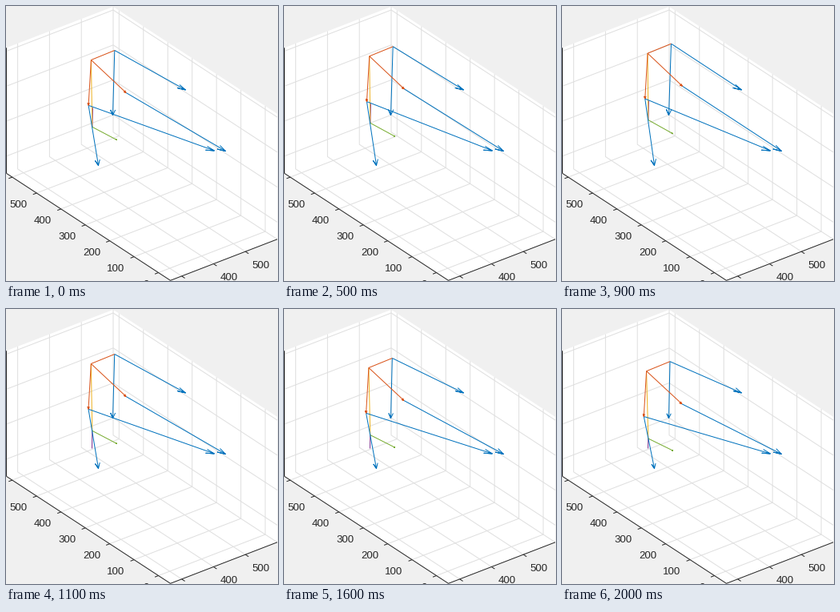
Animation, 340 px wide and 344 px high, one loop 2100 ms. Source, as a matplotlib script:

```python
import numpy as np
import matplotlib.pyplot as plt
from matplotlib.animation import FuncAnimation

W, H, DPI = 340, 344, 72
FRAMES, STEP_MS = 21, 100

BLUE, ORANGE, YELLOW = "#0072BD", "#D95319", "#EDB120"
PURPLE, GREEN = "#7E2F8E", "#77AC30"
INK, GRID, PANEL = "#262626", "#DFDFDF", "#F0F0F0"

plt.rcParams["path.snap"] = False

# Projected axes box
LEFT = np.array([0, 208.8])
X_EDGE = np.array([133.5, -51.5])
Y_EDGE = np.array([205, 134.0])
Z_EDGE = np.array([0, -157.0])
BACK = LEFT + X_EDGE
FRONT = LEFT + Y_EDGE

fig = plt.figure(figsize=(W / DPI, H / DPI), dpi=DPI, facecolor=PANEL)
ax = fig.add_axes([0, 0, 1, 1])
ax.set_xlim(-0.5, W - 0.5)
ax.set_ylim(H - 0.5, -0.5)
ax.axis("off")


def line(*pts, color=INK, lw=1, z=2):
    xs, ys = zip(*pts)
    return ax.plot(xs, ys, color=color, lw=lw, zorder=z,
                   solid_capstyle="butt", solid_joinstyle="miter")[0]


def label(x, y, text):
    ax.text(x, y, text, color=INK, fontsize=13.3, family="Liberation Sans",
            ha="center", va="center_baseline", zorder=3)


def draw_box():
    right = BACK + Y_EDGE
    outline = [LEFT, FRONT, right, right + Z_EDGE, BACK + Z_EDGE, LEFT + Z_EDGE]
    ax.fill(*zip(*outline), color="white", lw=0, zorder=0)

    def grid(*pts):
        line(*pts, color=GRID, z=1)

    for k in range(4):
        p = LEFT + X_EDGE * (14.1 + 39.8 * k) / X_EDGE[0]
        grid(p + Z_EDGE, p, p + Y_EDGE)
    for k in range(7):
        p = LEFT + Y_EDGE * (7.3 + 30.46 * k) / Y_EDGE[0]
        grid(p, p + X_EDGE, p + X_EDGE + Z_EDGE)
        line(p, p + (-4.5, 1.7))
        if k:
            label(p[0] - (22.6 if k < 6 else 15.4), p[1] + 13.5,
                  str(100 * (6 - k)))
    for y in (4.5, 48.3, 92, 135.8):
        p = np.array([BACK[0], y])
        grid(p - X_EDGE, p, p + Y_EDGE)

    for k in range(3):
        p = FRONT + X_EDGE * (14.1 + 39.8 * k) / X_EDGE[0]
        line(p, p + (4, 2.6))
        if k:
            label(p[0] + 19.5, p[1] + 16, str(300 + 100 * k))

    line(LEFT + Z_EDGE, LEFT)
    line(LEFT, FRONT, right)


draw_box()

# Platform corners at rest
CORNERS = {"hub": (105.9, 67), "right": (135.3, 55),
           "mid": (149.6, 108), "low": (102.6, 123.8)}
# Corner, fixed tip, two head wings
LEGS = [
    ("right", (224, 104.5), (-10.5, -2.5), (-7.5, -6.5)),
    ("right", (133, 136), (-2.8, -6.5), (3.2, -6.5)),
    ("mid", (274, 181), (-10.5, -2.5), (-7, -7)),
    ("low", (260, 180.5), (-11, -0.8), (-9, -5.5)),
    ("low", (115, 199), (-4, -6), (1.8, -7.5)),
]

legs = [line((0, 0), color=BLUE, z=5) for _ in LEGS]
arms = [line((0, 0), color=ORANGE, z=6) for _ in range(3)]
rod = line((0, 0), color=PURPLE, z=3)
mast = line((0, 0), color=YELLOW, z=4)
foot = line((0, 0), color=GREEN, z=4)


def arrow(art, tail, tip, wings):
    tail, tip = np.array(tail), np.array(tip)
    pts = [tail, tip, tip + wings[0], tip, tip + wings[1]]
    art.set_data(*zip(*pts))


def small_arrow(art, tail, tip, size=3):
    d = np.subtract(tip, tail)
    u = d / np.hypot(*d)
    n = np.array([-u[1], u[0]])
    back, side = -size * u, 0.4 * size * n
    arrow(art, tail, tip, (back + side, back - side))


def update(i):
    rising = i <= 10
    s = -i if rising else i - 10
    dy = s * (0.97 + 0.005 * s)
    pos = {k: np.array([x - 0.08 * dy, y + dy]) for k, (x, y) in CORNERS.items()}
    pos["mid"][0] = CORNERS["mid"][0] - 0.03 * dy

    for art, (name, tip, a, b) in zip(legs, LEGS):
        rest = np.hypot(*np.subtract(tip, CORNERS[name]))
        k = np.hypot(*(tip - pos[name])) / rest
        arrow(art, pos[name], tip, (k * np.array(a), k * np.array(b)))
    arms[0].set_data(*zip(pos["hub"], pos["right"]))
    small_arrow(arms[1], pos["hub"], pos["mid"])
    small_arrow(arms[2], pos["hub"], pos["low"])

    base = np.array([107.3, 150.8 + 1.05 * dy])
    mast.set_data(*zip(pos["hub"], base))
    small_arrow(foot, base, (138 + 0.02 * dy, 167 + 0.95 * dy), 1.3)
    rod.set_data(*zip(base, (107.9, base[1] - 24) if rising else (107, 174)))
    return [*legs, *arms, rod, mast, foot]


anim = FuncAnimation(fig, update, frames=FRAMES, interval=STEP_MS,
                     repeat=True, repeat_delay=0, blit=False)
plt.show()
```
